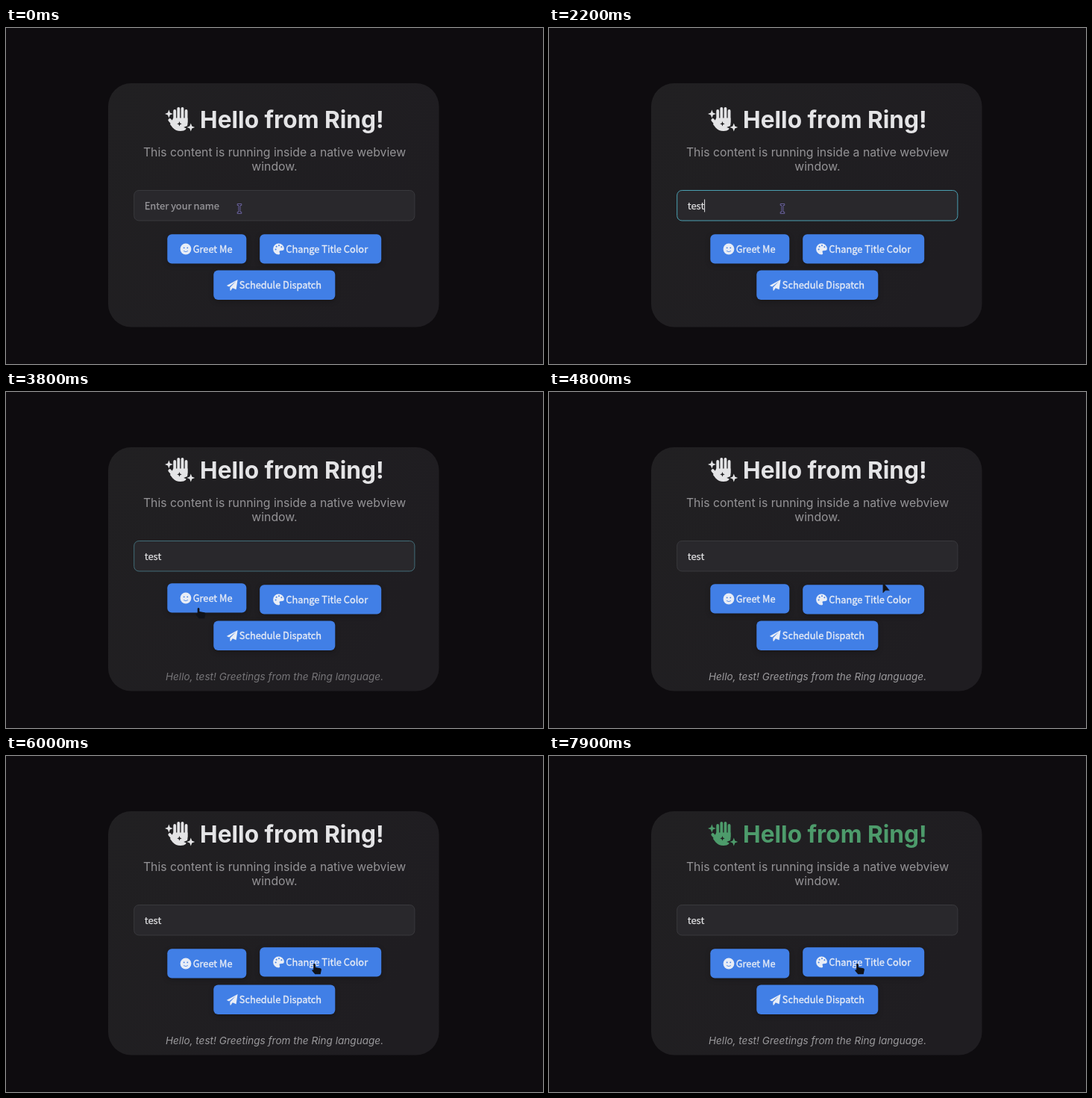
Write an HTML page that moves like this. It is 720 px wide and 450 px high and loops after 8000 ms.

```html
<!DOCTYPE html>
<html lang="en">
<head>
<meta charset="utf-8">
<title>Webview greeting</title>
<style>
html, body { margin: 0; width: 100%; height: 100%; overflow: hidden; background: #0e0c0f; }
svg { display: block; width: 720px; height: 450px; }
text { font-family: Inter, sans-serif; font-optical-sizing: none; white-space: pre; }
.mid { text-anchor: middle; }
.sub { font-size: 15.8px; fill: #949396; }
.ui, .btn text { font-family: "Noto Sans CJK SC", "Noto Sans CJK JP", "Noto Sans CJK", "Noto Sans", sans-serif; }
.ui { font-size: 13px; stroke: currentColor; stroke-width: .25; fill: currentColor; }
.btn text { font-size: 12.8px; fill: #e6ebf5; stroke: #e6ebf5; stroke-width: .35; }
.btn > rect { fill: #417fe6; filter: drop-shadow(0 2px 3px #0004); }
.icon { fill: #e8edf6; }
</style>
</head>
<body>
<svg viewBox="0 0 720 450">
  <defs>
    <linearGradient id="panel" x2="1" y2=".4">
      <stop stop-color="#212022"/><stop offset="1" stop-color="#1f1d21"/>
    </linearGradient>
    <path id="spark" d="M0-5.4 1.5-1.5 5.4 0 1.5 1.5 0 5.4-1.5 1.5-5.4 0-1.5-1.5Z"/>
  </defs>
  <rect width="720" height="450" fill="#0e0c0f"/>
  <rect x="137" y="74" width="443.5" height="326.5" rx="31" fill="url(#panel)"/>

  <g id="content">
    <g id="title">
      <g stroke="currentColor" stroke-linecap="round" fill="none">
        <path stroke-width="3.8" d="M226.200 111V125M231.300 107.800V124M236.500 107.800V124M241.600 111V126"/>
        <path stroke-width="4.400" d="M219.600 123.400 226 130.500"/>
      </g>
      <path fill="currentColor" d="M224.300 120.500H243.500V128Q243.500 138 234 138Q227.500 138 223.500 133.500L220 129Z"/>
      <use href="#spark" x="218.400" y="115" fill="currentColor"/>
      <use href="#spark" fill="#1f1f21" transform="translate(232.500 128.300) scale(.6)"/>
      <use href="#spark" x="247.800" y="133" fill="currentColor" stroke="#1f1f21" stroke-width="3" paint-order="stroke"/>
      <text x="260" y="133.700" font-size="31.650" font-weight="700" fill="currentColor">Hello from Ring!</text>
    </g>
    <text class="sub mid" x="360" y="172.300">This content is running inside a native webview</text>
    <text class="sub mid" x="360" y="191.200">window.</text>

    <rect id="field" x="171.700" y="217.500" width="376.200" height="40.500" rx="6.500" fill="#29282c"/>
    <text id="entry" class="ui" x="185.700" y="243"></text>
    <path id="caret" stroke="#e4e4e6" d="M0 229.500V246.500"/>

    <g class="btn" id="greet">
      <rect x="216.300" y="276.200" width="106" height="39.300" rx="6"/>
      <circle class="icon" cx="241" cy="296" r="7.400"/>
      <g fill="#417fe6"><circle cx="238.700" cy="294.400" r=".9"/><circle cx="243.300" cy="294.400" r=".9"/></g>
      <path d="M238 298.500Q241 301 244 298.500" fill="none" stroke="#417fe6" stroke-width=".8"/>
      <text x="250.700" y="301">Greet Me</text>
    </g>
    <g class="btn" id="recolor">
      <rect x="340.200" y="276.200" width="163" height="39.300" rx="6"/>
      <path class="icon" d="M365.500 288.600A7.400 7.400 0 0 1 372.900 295.600C372.900 298 371 298.300 368.500 298.300 366 298.300 366.500 300 367 301 367.600 302.600 366.800 303.400 365.500 303.400A7.400 7.400 0 0 1 365.500 288.600Z"/>
      <g fill="#417fe6"><circle cx="361.600" cy="296.500" r="1"/><circle cx="362.600" cy="292.800" r="1"/><circle cx="366" cy="291.200" r="1"/><circle cx="369.400" cy="293.300" r="1"/></g>
      <text x="375.300" y="301">Change Title Color</text>
    </g>
    <g class="btn">
      <rect x="278.300" y="324.600" width="163" height="39.300" rx="6"/>
      <path class="icon" d="M310.600 337 308.600 350.200 303.800 348.300 301.300 351.700 300.400 351.500V347.400L308 339.600 299.200 346.500 295.800 345.100Z"/>
      <text x="312.800" y="349.300">Schedule Dispatch</text>
    </g>
  </g>

  <text id="reply" class="mid" x="360" y="386.400" font-size="13.580" font-style="italic" fill="#9a999c">Hello, test! Greetings from the Ring language.</text>

  <g id="pointer">
    <path id="beam" fill="#201f27" stroke="#7b72b8" stroke-width=".8" d="M-2.800-6.500H2.800V-4.500H1V4.500H2.800V6.500H-2.800V4.500H-1V-4.500H-2.800Z"/>
    <path id="arrow" fill="#121216" stroke="#29303f" stroke-width=".5" d="M.8.8V15L4 11.800H9.500Z"/>
    <path id="hand" fill="#111319" d="M-1.300 1Q0-.8 1.400 1V5L8 6.300Q9.600 6.800 9.400 8.300L8.200 14.200H.8L-3.200 9.500Q-3.300 7.500-1.300 8.500Z"/>
  </g>
</svg>
<script>
const LOOP = 8000, LIFT = 18;
const $ = id => document.getElementById(id);
const show = (id, on) => $(id).setAttribute("visibility", on ? "visible" : "hidden");
const shift = (id, x, y) => $(id).setAttribute("transform", `translate(${x} ${y})`);

// Smooth 0 to 1 ramp
function ramp(t, start, length = 300) {
  const p = Math.min(1, Math.max(0, (t - start) / length));
  return p * p * (3 - 2 * p);
}
const mix = (a, b, p) => a.map((v, i) => v + (b[i] - v) * p);
const rgb = c => `rgb(${c.map(Math.round)})`;

// time, x, y of the pointer's hot spot
const path = [
  [0, 313, 242], [2950, 313, 242], [3200, 258, 289], [4450, 258, 289],
  [4800, 447, 254], [5300, 484, 307], [5600, 474, 298], [5700, 474, 298],
  [5800, 413.5, 278], [LOOP, 413.5, 278]
];
function pointerAt(t) {
  const i = path.findIndex(k => k[0] > t), a = path[i - 1], b = path[i];
  return mix(a, b, (t - a[0]) / (b[0] - a[0])).slice(1);
}

const keyTimes = [1200, 1500, 1800, 2000];
const titleColors = [[228, 228, 230], [74, 92, 184], [75, 124, 146], [77, 155, 107]];
const clicks = [6150, 6870, 7470];

function draw(t) {
  const clicked = t >= 3700;
  shift("content", 0, clicked ? -LIFT : 0);
  show("reply", clicked);
  $("reply").setAttribute("opacity", 0.4 + 0.6 * ramp(t, 3650));

  const focus = ramp(t, 20, 280) - ramp(t, 3650);
  $("field").setAttribute("stroke", rgb(mix([57, 57, 61], [75, 160, 178], focus)));

  const typed = keyTimes.filter(k => t >= k).length;
  const entry = $("entry");
  entry.textContent = typed ? "test".slice(0, typed) : "Enter your name";
  entry.setAttribute("color", typed ? "#e0e0e2" : "#98979b");
  shift("caret", 186 + (typed ? entry.getComputedTextLength() : 0), 0);
  show("caret", t >= 100 && t < 500 || t >= 1200 && t < 2800);

  shift("greet", 0, -2 * (ramp(t, 3200) - ramp(t, 4650)));
  shift("recolor", 0, -2 * ramp(t, 4880));

  const color = clicks.reduce((c, at, i) => mix(c, titleColors[i + 1], ramp(t, at, 400)), titleColors[0]);
  $("title").setAttribute("color", rgb(color));

  shift("pointer", ...pointerAt(t));
  const kind = t < 3100 ? "beam" : t < 3200 || t >= 4600 && t < 4900 ? "arrow" : "hand";
  for (const id of ["beam", "arrow", "hand"]) show(id, id === kind);
}

const begin = performance.now();
function frame() {
  const t = (performance.now() - begin) % LOOP;
  draw(Math.floor(t / 100) * 100);
  requestAnimationFrame(frame);
}
frame();
</script>
</body>
</html>
```
